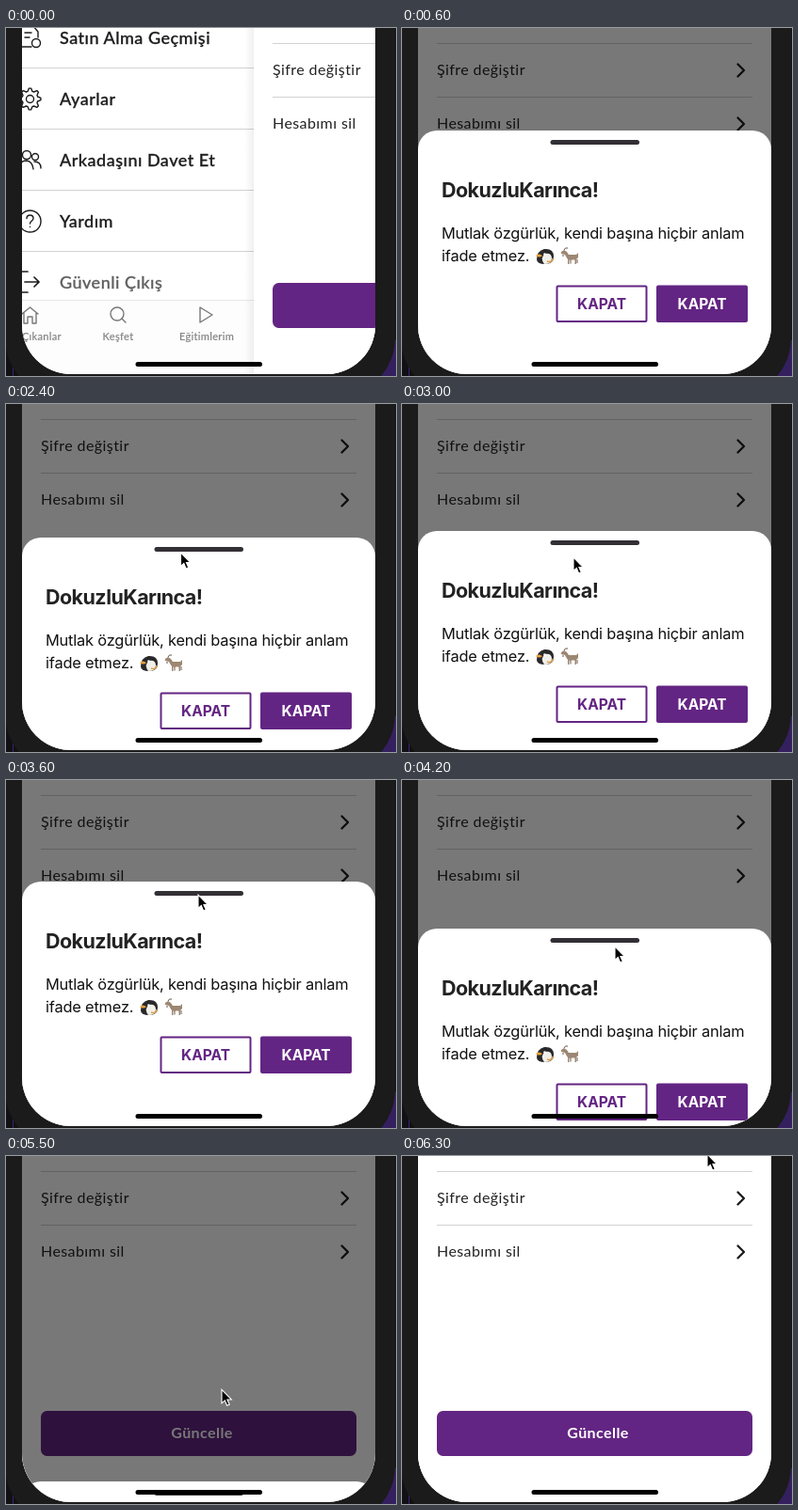
Recreate the animation shown at these times as an HTML page. Size 414 px wide and 370 px high, loop 6400 ms.

```html
<!DOCTYPE html>
<html lang="tr">
<head>
<meta charset="utf-8">
<title>Alt sayfa</title>
<style>
  html, body { margin: 0; width: 100%; height: 100%; overflow: hidden; background: #1b1b1b; }
  svg { display: block; width: 414px; height: 370px; }
  text { white-space: pre; }
  .page { font: 16px Lato, "Open Sans", sans-serif; letter-spacing: .42px; fill: #222; }
  .menu { font: 500 18px Lato, "Open Sans", sans-serif; letter-spacing: .5px; fill: #1c1c1c; stroke: #1c1c1c; stroke-width: .3; }
  .tabs { font: 500 11px Lato, "Open Sans", sans-serif; letter-spacing: .33px; fill: #858585; stroke: #858585; stroke-width: .15; }
  .cta { font-weight: 700; fill: #fff; text-anchor: middle; }
  .title { font: 700 21.5px Inter, sans-serif; letter-spacing: -.55px; fill: #222; }
  .body { font: 400 16.4px Inter, sans-serif; letter-spacing: -.19px; fill: #111; }
  .btn { font: 700 15.5px Inter, sans-serif; text-anchor: middle; }
  .icon { fill: none; stroke: #1c1c1c; stroke-width: 1.4; stroke-linecap: round; stroke-linejoin: round; }
  .gray { stroke: #777; }
  .rule { stroke: #d2d2d2; stroke-width: 1; }
</style>
</head>
<body>
<svg viewBox="0 0 414 370">
  <defs>
    <clipPath id="screen"><rect x="17" y="-100" width="375" height="468" rx="52"/></clipPath>
    <linearGradient id="edge"><stop offset="0" stop-opacity="0"/><stop offset="1" stop-opacity=".06"/></linearGradient>
  </defs>

  <rect width="414" height="370" fill="#111014"/>
  <rect x="207" y="300" width="207" height="70" fill="#35205f"/>
  <path d="M7.5 361V370" stroke="#3a2468"/>
  <rect x="-1" y="-100" width="414" height="492" rx="62" fill="#1b1b1b"/>
  <path d="M413.500 0V332" stroke="#111"/>

  <g clip-path="url(#screen)">
    <rect x="17" width="375" height="370" fill="#fff"/>

    <g id="menu">
      <path class="rule" d="M-60 42.500H400M-60 107.500H400M-60 172.500H400M-60 237.500H400"/>
      <g class="menu">
        <text x="57" y="17">Satın Alma Geçmişi</text>
        <text x="57" y="82">Ayarlar</text>
        <text x="57" y="147">Arkadaşını Davet Et</text>
        <text x="57" y="212">Yardım</text>
        <text x="57" y="277" opacity=".7">Güvenli Çıkış</text>
      </g>
      <g class="icon">
        <path d="M16 -2H29L34 4V10M16 -2V20H27M20 5H27M20 10H25"/>
        <circle cx="32" cy="16" r="4.500"/>
        <circle cx="25.500" cy="75.500" r="4"/>
        <path id="gear"/>
        <circle cx="22" cy="135" r="4.500"/><circle cx="31" cy="137" r="3.500"/>
        <path d="M13 150Q14 141 22 141Q28 142 29 150M30 142Q37 142 37 149"/>
        <circle cx="25.500" cy="205.500" r="11.500"/>
        <path d="M22 202.500Q22 199 25.500 199T29 202.500C29 205 25.500 205 25.500 208M25.500 211.500V211.600"/>
        <path d="M23 259H13V281H23M20 270H35M30 265L35 270L30 275" stroke-width="1.700"/>
      </g>
      <rect x="-60" y="289" width="460" height="90" fill="#fdfdfd"/>
      <path d="M-60 289.500H400" stroke="#e6e6e6"/>
      <g class="icon gray" stroke-width="1.700">
        <path d="M17 304L25.500 297L34 304M19 303V314H23V307H28V314H32V303"/>
        <circle cx="118" cy="304" r="7"/><path d="M123 309L127 313"/>
        <path d="M206 297V313L219 305Z"/>
      </g>
      <g class="tabs">
        <text x="59" y="332" text-anchor="end">Öne Çıkanlar</text>
        <text x="119" y="332" text-anchor="middle">Keşfet</text>
        <text x="213" y="332" text-anchor="middle">Eğitimlerim</text>
      </g>
    </g>

    <g id="page" class="page">
      <rect x="7" width="10" height="370" fill="url(#edge)"/>
      <rect x="17" width="375" height="370" fill="#fff"/>
      <path class="rule" d="M37 16.500H372M37 73.500H372"/>
      <text x="37" y="50">Şifre değiştir</text>
      <text x="37" y="107">Hesabımı sil</text>
      <path class="icon" style="stroke-width:2.300" d="M356.500 38.500L363 45L356.500 51.500M356.500 95.500L363 102L356.500 108.500"/>
      <rect x="37" y="271" width="335" height="48" rx="6.500" fill="#632583"/>
      <text class="cta" x="208" y="300">Güncelle</text>
    </g>

    <rect id="dim" x="17" width="375" height="370"/>

    <g id="sheet">
      <rect x="17" width="375" height="420" rx="20" fill="#fff"/>
      <rect x="157.500" y="10" width="94.500" height="5" rx="2.500" fill="#322f35"/>
      <text class="title" x="42" y="71">DokuzluKarınca!</text>
      <text class="body" x="42" y="114.500">Mutlak özgürlük, kendi başına hiçbir anlam</text>
      <text class="body" x="42" y="138.500">ifade etmez.</text>
      <g transform="translate(142 124)">
        <path d="M1 13Q1 4 9 2Q19 1 19 10Q19 18 10 18Q1 18 1 13Z" fill="#29282b"/>
        <path d="M9 18Q4 11 10 7Q17 6 17 12Q17 18 9 18Z" fill="#f1efe9"/>
        <path d="M0 9Q3 6 7 9Q4 12 0 9Z" fill="#e9a23b"/>
        <circle cx="9.500" cy="7.500" r="1.300" fill="#fff"/>
        <path d="M12 15Q17 17 18 12" fill="none" stroke="#dba04b" stroke-width="1.500"/>
      </g>
      <g transform="translate(168 124)" fill="#9c8772">
        <path d="M1 5L4 3L7 5L9 8H17L19 6V11L17 13V18H15.500V13.500H9.500V18H8V13L6 10L5 8L1 7Z"/>
        <path d="M4 3Q5 0 8 1M3 8V10" fill="none" stroke="#655442"/>
        <path d="M11 13V17.500M18 13V17" stroke="#6f5b48"/>
      </g>
      <rect x="164.500" y="165.500" width="95" height="37.500" rx="1" fill="#fff" stroke="#632583" stroke-width="2"/>
      <rect x="270" y="164.500" width="97" height="39.500" rx="2" fill="#632583"/>
      <text class="btn" x="212" y="190" fill="#632583">KAPAT</text>
      <text class="btn" x="318.500" y="190" fill="#fff">KAPAT</text>
    </g>

    <rect x="137.500" y="355" width="134.500" height="5" rx="2.500"/>
  </g>

  <path id="cursor" d="M0 0V14.500L3.300 11.500L5.600 17L8.200 15.900L5.900 10.600H10.300Z" fill="#000" stroke="#fff" stroke-width="1.100"/>
</svg>

<script>
  const LOOP = 6400, TICK = 100;
  const el = id => document.getElementById(id);

  // Each track holds [ms, value] stops.
  const pageX = [[0, 246], [100, 105], [200, 28], [300, 0]];
  const sheetY = [[300, 372], [400, 225], [500, 130], [600, 109], [800, 109], [900, 108], [1900, 108],
    [2100, 112], [2400, 142], [2700, 116], [3000, 135], [3100, 140], [3400, 106], [3600, 108],
    [4200, 158], [4900, 201], [5300, 240], [5400, 300], [5500, 346], [5600, 368], [5700, 380]];
  const dim = [[300, 0], [400, .26], [500, .46], [600, .53], [5600, .53], [5900, 0]];
  const cursorX = [[800, 416], [1100, 300], [1400, 195], [1800, 189], [3000, 182], [4200, 226], [5500, 229], [5700, 232], [6300, 324]];
  const cursorY = [[800, 30], [1100, 60], [1400, 116], [1900, 118], [2100, 124], [2400, 158], [2700, 136],
    [3000, 163], [3400, 120], [3600, 122], [4200, 177], [4900, 221], [5300, 249], [5600, 248], [6300, -2]];

  function at(track, t) {
    const i = track.findIndex(stop => stop[0] > t);
    if (i < 0) return track[track.length - 1][1];
    if (i === 0) return track[0][1];
    const [t0, a] = track[i - 1], [t1, b] = track[i];
    return a + (b - a) * (t - t0) / (t1 - t0);
  }

  const move = (id, x, y) => el(id).setAttribute("transform", `translate(${x} ${y})`);

  function gearPath() {
    const points = [];
    for (let i = 0; i < 32; i++) {
      const a = (i - .5) * Math.PI / 16, r = i % 4 < 2 ? 11.5 : 8.5;
      points.push((25.5 + r * Math.cos(a)).toFixed(1) + " " + (75.5 + r * Math.sin(a)).toFixed(1));
    }
    return "M" + points.join("L") + "Z";
  }

  function draw() {
    const t = Math.floor(performance.now() % LOOP / TICK) * TICK;
    const x = at(pageX, t);
    move("page", x, 0);
    move("menu", (x - 246) * .3, 0);
    move("sheet", 0, Math.round(at(sheetY, t)));
    move("cursor", at(cursorX, t), at(cursorY, t));
    el("dim").setAttribute("opacity", at(dim, t));
    requestAnimationFrame(draw);
  }

  el("gear").setAttribute("d", gearPath());
  draw();
</script>
</body>
</html>
```
